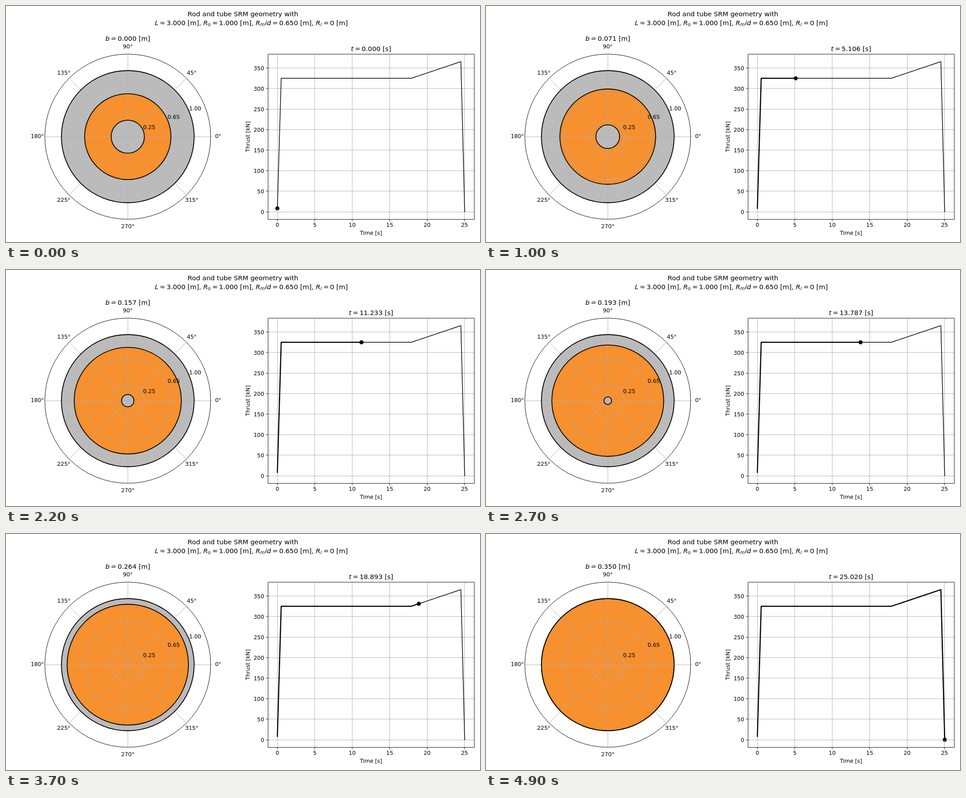
These frames come from a looping animation (1058 by 529 pixels, 5000 ms). An HTML page with a canvas:

```html
<!DOCTYPE html>
<html lang="en">
<head>
<meta charset="utf-8">
<title>Rod and tube grain burn</title>
<style>
  html, body { margin: 0; width: 100%; height: 100%; overflow: hidden; background: #fff; }
  canvas { display: block; }
</style>
</head>
<body>
<canvas id="stage" width="1058" height="529"></canvas>
<script>
const ctx = document.getElementById('stage').getContext('2d');
const STEPS = 50, STEP_MS = 100, LAST = STEPS - 1;
const BURN_TIME = 25.02, WEB = 0.35;
const ROD = 0.25, TUBE = 0.65, OUTER = 1, RIM = 1.25;

// The figure is laid out on a 1200 x 600 sheet at 100 dpi, then scaled to the stage.
const WIDTH = 1200, HEIGHT = 600;
ctx.scale(1058 / WIDTH, 529 / HEIGHT);
const PT = 100 / 72;
const SMALL = 10 * PT, LARGE = 12 * PT, HAIR = 0.8 * PT;
const GREY = '#bbbbbb', ORANGE = '#f7902e', GRID = '#b0b0b0';

const polar = { x: 308.3, y: 332.2, unit: 168 };
const box = { left: 663.5, right: 1185.5, top: 122.5, bottom: 542.5 };
const midX = 924.2;
const px = t => 687 + t * 18.956;
const py = kN => 523.1 - kN * 1.044;
const snap = v => Math.floor(v) + 0.5;

// Thrust is flat while the rod burns, then grows with the tube's inner surface.
function thrust(i) {
  if (i === 0) return 8.2;
  if (i === LAST) return 0;
  const b = WEB * i / LAST;
  return 325 * Math.pow(Math.max(1, (TUBE + b) / (TUBE + ROD)), 1.2);
}
const curve = Array.from({ length: STEPS }, (_, i) =>
  [px(BURN_TIME * i / LAST), py(thrust(i))]);

function font(size, italic) {
  ctx.font = `${italic ? 'italic ' : ''}${size}px "DejaVu Sans", sans-serif`;
}

function text(s, x, y, size = SMALL, align = 'center') {
  font(size);
  ctx.fillStyle = '#000';
  ctx.textAlign = align;
  ctx.fillText(s, x, y);
}

// Markup: *x* is italic, _x is an italic subscript, = gets relation spacing.
function mathText(s, centre, y) {
  const gap = 0.195 * LARGE;
  const pieces = s.match(/\*[^*]+\*|_.|=|[^*_=]+/g).map(part => {
    const sub = part[0] === '_', italic = sub || part[0] === '*';
    const label = part.replace(/[*_]/g, '');
    const size = sub ? LARGE * 0.7 : LARGE;
    const pad = part === '=' ? gap : 0;
    font(size, italic);
    const width = ctx.measureText(label).width + 2 * pad + (sub ? 0.8 : 0);
    return { label, size, italic, pad, width, drop: sub ? 2.6 : 0 };
  });
  let x = centre - pieces.reduce((sum, p) => sum + p.width, 0) / 2;
  ctx.fillStyle = '#000';
  ctx.textAlign = 'left';
  for (const p of pieces) {
    font(p.size, p.italic);
    ctx.fillText(p.label, x + p.pad, y + p.drop);
    x += p.width;
  }
}

function line(points, color, width) {
  ctx.beginPath();
  points.forEach(([x, y]) => ctx.lineTo(x, y));
  ctx.strokeStyle = color;
  ctx.lineWidth = width;
  ctx.stroke();
}

function disc(x, y, r, fill) {
  ctx.beginPath();
  ctx.arc(x, y, r, 0, 2 * Math.PI);
  ctx.fillStyle = fill;
  ctx.fill();
}

function ring(r, color, width) {
  ctx.beginPath();
  ctx.arc(polar.x, polar.y, r * polar.unit, 0, 2 * Math.PI);
  ctx.strokeStyle = color;
  ctx.lineWidth = width;
  ctx.stroke();
}

function drawGrain(b) {
  const { x, y, unit } = polar;
  const rim = RIM * unit, rod = ROD - b, tube = TUBE + b;
  const hasRod = rod > 1e-6;

  disc(x, y, OUTER * unit, GREY);
  disc(x, y, tube * unit, ORANGE);
  if (hasRod) disc(x, y, rod * unit, GREY);

  const d = rim * Math.SQRT1_2;
  line([[x - rim, snap(y)], [x + rim, snap(y)]], GRID, HAIR);
  line([[snap(x), y - rim], [snap(x), y + rim]], GRID, HAIR);
  line([[x - d, y - d], [x + d, y + d]], GRID, HAIR);
  line([[x - d, y + d], [x + d, y - d]], GRID, HAIR);
  for (const r of [ROD, TUBE, OUTER]) ring(r, GRID, HAIR);

  for (const r of [OUTER, tube]) ring(r, '#000', 1.5 * PT);
  if (hasRod) ring(rod, '#000', 1.5 * PT);
  ring(RIM, '#000', HAIR);

  for (let deg = 0; deg < 360; deg += 45) {
    const a = deg * Math.PI / 180;
    text(deg + '°', x + 229 * Math.cos(a), y - 229 * Math.sin(a) + 4);
  }
  const tilt = Math.PI / 8;
  for (const r of [ROD, TUBE, OUTER]) {
    text(r.toFixed(2), x + r * unit * Math.cos(tilt),
      y - r * unit * Math.sin(tilt) - 3, SMALL, 'left');
  }
  mathText(`*b*=${b.toFixed(3)} [m]`, x, 88);
}

function drawThrust(i) {
  const { left, right, top, bottom } = box;
  const tickLength = 3.5 * PT;
  const [mx, my] = curve[i];
  disc(mx, my, 3.75 * PT, '#000');

  for (let t = 0; t <= 25; t += 5) {
    const x = snap(px(t));
    line([[x, top], [x, bottom]], GRID, HAIR);
    line([[x, bottom], [x, bottom + tickLength]], '#000', HAIR);
    text(t, px(t), 562);
  }
  for (let kN = 0; kN <= 350; kN += 50) {
    const y = snap(py(kN));
    line([[left, y], [right, y]], GRID, HAIR);
    line([[left - tickLength, y], [left, y]], '#000', HAIR);
    text(kN, 653.5, py(kN) + 5.2, SMALL, 'right');
  }

  ctx.lineJoin = 'round';
  ctx.lineCap = 'square';
  line(curve, '#000', 1.2 * PT);
  if (i > 0) line(curve.slice(0, i + 1), '#000', 2 * PT);
  ctx.lineCap = 'butt';
  ctx.lineJoin = 'miter';

  ctx.lineWidth = HAIR;
  ctx.strokeRect(left, top, right - left, bottom - top);

  text('Time [s]', midX, 582);
  ctx.save();
  ctx.translate(617, polar.y);
  ctx.rotate(-Math.PI / 2);
  text('Thrust [kN]', 0, 0);
  ctx.restore();
  mathText(`*t*=${(BURN_TIME * i / LAST).toFixed(3)} [s]`, midX, 114);
}

function draw(i) {
  ctx.fillStyle = '#fff';
  ctx.fillRect(0, 0, WIDTH, HEIGHT);
  text('Rod and tube SRM geometry with', 600, 26, LARGE);
  mathText('*L*=3.000 [m], *R*_o=1.000 [m], *R*_m*id*=0.650 [m], *R*_i=0 [m]', 621.2, 49);
  drawGrain(WEB * i / LAST);
  drawThrust(i);
}

const start = performance.now();
function tick() {
  const elapsed = Math.max(0, performance.now() - start);
  draw(Math.floor(elapsed / STEP_MS) % STEPS);
  requestAnimationFrame(tick);
}
tick();
</script>
</body>
</html>
```
